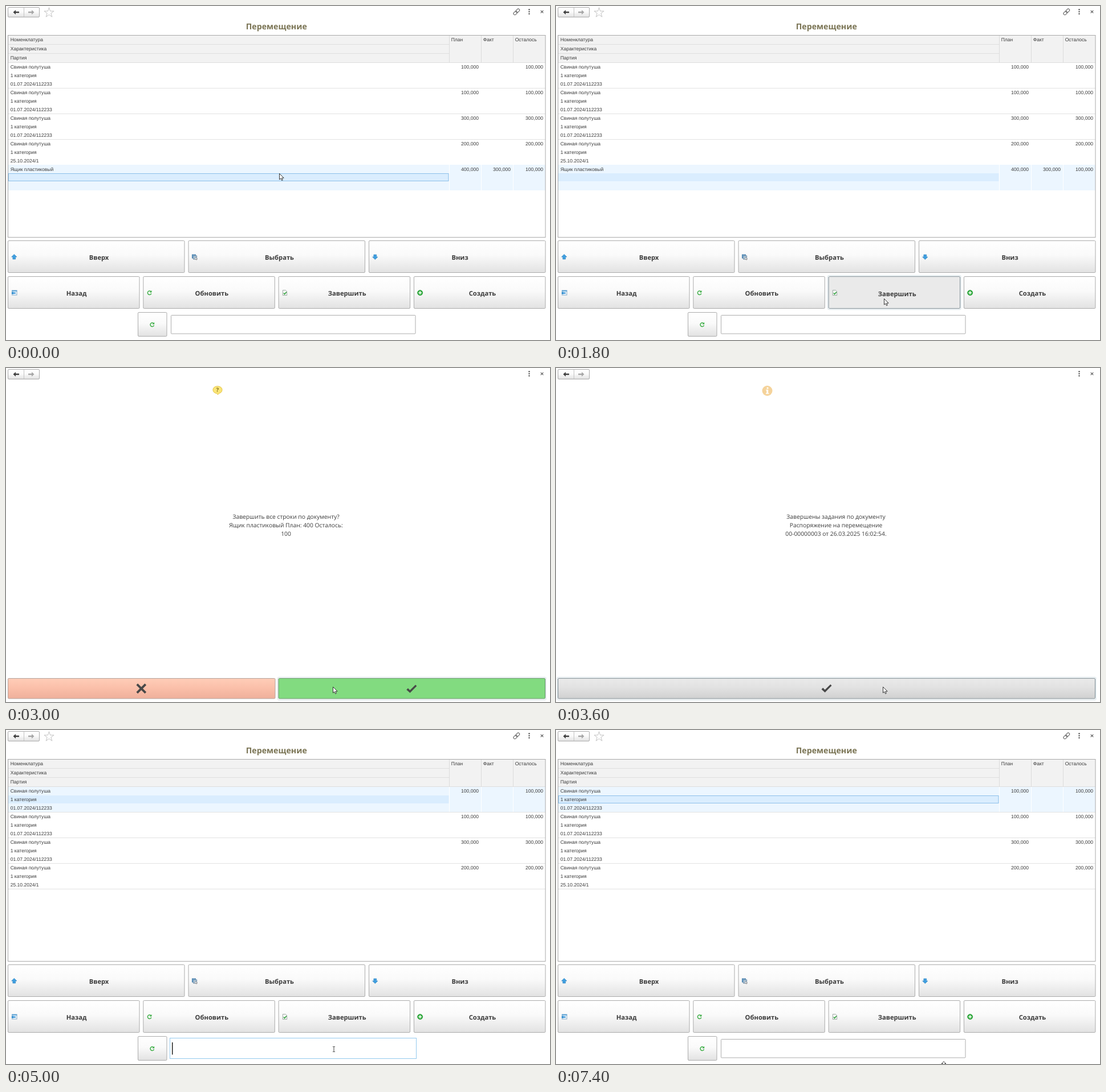
Recreate the animation shown at these times as an HTML page. Size 954 by 587 pixels, loop 7800 ms.

```html
<!DOCTYPE html>
<html lang="ru">
<head>
<meta charset="utf-8">
<title>Перемещение</title>
<style>
html, body { margin: 0; width: 100%; height: 100%; overflow: hidden; background: #fff; }
svg { display: block; width: 954px; height: 587px; }
text { text-rendering: geometricPrecision; fill: #3a3a3a; }
.cell { font: 8.55px "Liberation Sans", Arial, sans-serif; }
.label { font: bold 11.2px "Open Sans", "Noto Sans", sans-serif; text-anchor: middle; }
.title { font: bold 14.2px "Open Sans", "Noto Sans", sans-serif; text-anchor: middle; fill: #7a7454; }
.note { font: 10.3px "Open Sans", "Noto Sans", sans-serif; text-anchor: middle; }
.end { text-anchor: end; }
</style>
</head>
<body>
<svg viewBox="0 0 954 587">
  <defs id="fills"></defs>
  <g id="scene"></g>
  <g id="pointer"></g>
</svg>
<script>
const LOOP = 7800;

// time, scene, button state, selected cell framed, pointer shape, x, y
const STEPS = [
  [0, 'full', '', 1, 'arrow', 479, 294],
  [400, 'full', '', 1, 'arrow', 504, 298],
  [1000, 'full', '', 1, 'arrow', 546, 420],
  [1200, 'full', 'hover', 1, 'arrow', 574, 489],
  [1400, 'full', 'hover', 1, 'arrow', 710, 530],
  [1800, 'full', 'down', 0, 'arrow', 575, 514],
  [2000, 'ask', '', 0, 'arrow', 575, 514],
  [2600, 'ask', '', 0, 'arrow', 575, 543],
  [2800, 'ask', 'hover', 0, 'arrow', 573, 560],
  [3000, 'ask', 'down', 0, 'arrow', 573, 560],
  [3600, 'info', 'hover', 0, 'arrow', 573, 560],
  [4400, 'info', 'down', 0, 'arrow', 573, 560],
  [4800, 'info', 'down', 0, 'beam', 575, 561],
  [5000, 'rest', 'input', 0, 'beam', 575, 561],
  [5400, 'rest', 'input', 0, 'arrow', 559, 498],
  [5600, 'rest', 'input', 0, 'arrow', 493, 349],
  [5800, 'rest', 'input', 0, 'arrow', 475, 316],
  [6000, 'rest', 'input', 0, 'arrow', 473, 314],
  [6200, 'rest', '', 1, 'arrow', 473, 314],
  [6600, 'rest', 'hover', 1, 'arrow', 651, 547],
  [6800, 'rest', '', 1, 'arrow', 675, 579],
  [7000, 'rest', '', 1, 'arrow', 675, 582],
  [7400, 'rest', '', 1, 'resize', 680, 582]
];

const FILLS = {
  plain: ['#ffffff', '#fafafa', '#e2e2e2'],
  hover: ['#f3f3f3', '#ececec', '#d9d9d9'],
  wide: ['#eaeaea', '#e2e2e2', '#d0d0d0'],
  red: ['#ffcdb8', '#fbc0aa', '#efb09b'],
  green: ['#a9ffa6', '#9cf99a', '#8be988'],
  greenHover: ['#9cf29a', '#90e98e', '#80d97e']
};

const $ = id => document.getElementById(id);
$('fills').innerHTML = Object.entries(FILLS).map(([id, c]) =>
  `<linearGradient id="${id}" x2="0" y2="1"><stop stop-color="${c[0]}"/>` +
  `<stop offset=".45" stop-color="${c[1]}"/><stop offset="1" stop-color="${c[2]}"/></linearGradient>`).join('');

const rect = (x, y, w, h, fill, stroke = 'none', r = 0) =>
  `<rect x="${x}" y="${y}" width="${w}" height="${h}" rx="${r}" fill="${fill}" stroke="${stroke}"/>`;
const path = (d, fill, stroke = 'none', w = 1) =>
  `<path d="${d}" fill="${fill}" stroke="${stroke}" stroke-width="${w}"/>`;
const line = (d, stroke, w = 1) => path(d, 'none', stroke, w);
const dot = (x, y, r, fill, stroke = 'none') =>
  `<circle cx="${x}" cy="${y}" r="${r}" fill="${fill}" stroke="${stroke}"/>`;
const text = (x, y, s, cls) => `<text x="${x}" y="${y}" class="${cls}">${s}</text>`;
const at = (x, y, s) => `<g transform="translate(${x} ${y})">${s}</g>`;
const box = (x, y, w, h, fill = 'url(#plain)', stroke = '#ababab') => rect(x, y, w, h, fill, stroke, 1.5);
const ring = (x, y, w, h) => rect(x - 1.5, y - 2, w + 3, h + 4, 'none', '#d3dfe4', 2);

const arrowUp = path('M0-4.6L4.7 0H2.4V4H-2.4V0H-4.7Z', '#3f9fe0', '#2b7fbd', .6);
const icons = {
  up: arrowUp,
  down: `<g transform="rotate(180)">${arrowUp}</g>`,
  pick: rect(-4.3, -4, 6, 6, '#6fa9d6', '#4d7fa8') + rect(-2.3, -2, 6, 6, '#cfe0ee', '#6485a0') +
    line('M-1 0H2.5M-1 2H2.5', '#5f8bb0', .8) + path('M1 0V5L2.3 4L3.2 5.5L4 5L3.2 3.5H5Z', '#fff', '#555', .5),
  back: rect(-3.7, -4, 8.4, 8, '#f3f9fe', '#84a9c6') + rect(-4, -4.3, 9, 2, '#5ba4d8') +
    path('M-5 .5L-1.7-2V-.4H2.5V1.4H-1.7V3Z', '#1f86cf'),
  refresh: line('M2.4-2.3A3.3 3.3 0 1 0 3.2 1.2', '#3dae46', 1.5) + path('M3.9-4.2V-.4H.2Z', '#3dae46'),
  done: path('M-3.5-4.5H1.5L3.7-2.3V4.5H-3.5Z', '#fafafa', '#8a9690', .8) +
    line('M-2 .6L-.3 2.6L3-1.4', '#31a23d', 1.5),
  add: dot(0, 0, 4.5, '#3cb449', '#319c3d') + line('M-2.7 0H2.7M0-2.7V2.7', '#fff', 1.5),
  check: path('M-9 1.5L-6.3-1.2L-2.9 2.2L6.8-7.2L9-5L-2.8 7Z', '#484848'),
  cross: line('M-7.5-7.5L7.5 7.5M7.5-7.5L-7.5 7.5', '#484848', 3.8)
};

const pointers = {
  arrow: path('M.5.5V11L2.9 8.8L4.6 12.5L6.3 11.8L4.7 8.2H8.2Z', '#fff', '#222', .9),
  beam: line('M-2-4.5H-.5L0-4L.5-4.5H2M0-4V4M-2 4.5H-.5L0 4L.5 4.5H2', '#333', .9),
  resize: path('M0 .6L4 4.5H1.5V9H-1.5V4.5H-4Z', '#fff', '#222', .9)
};

function topBar(isList) {
  const arrow = 'M-5.5 0L-1-4V-1.2H5V1.2H-1V4Z';
  let s = box(3.5, 2.5, 55, 17) + line('M31.5 3V19', '#c4c4c4') +
    at(18, 11, path(arrow, '#404040')) +
    at(44, 11, `<g transform="scale(-1 1)">${path(arrow, '#a6a6a6')}</g>`) +
    [6.3, 10, 13.7].map(y => dot(917.5, y, 1.2, '#555')).join('') +
    line('M937.7 7.8L942.3 12.4M942.3 7.8L937.7 12.4', '#555', 1.1);
  if (!isList) return s;
  const star = Array.from({ length: 10 }, (_, i) => {
    const r = i % 2 ? 3.5 : 9, a = i * Math.PI / 5;
    return `${(75.5 + r * Math.sin(a)).toFixed(2)} ${(11.8 - r * Math.cos(a)).toFixed(2)}`;
  });
  const link = '<rect x="-6.5" y="-2.3" width="7.2" height="4.6" rx="2.3" fill="none" stroke="#666" stroke-width="1.1"/>';
  return s + line(`M${star.join('L')}Z`, '#bcbcbc', .9) +
    `<g transform="translate(895.3 10.3) rotate(-45)">${link}<g transform="rotate(180)">${link}</g></g>`;
}

function table(rows, selected, framed) {
  const cols = [777, 833, 889], pitch = 44.8;
  let s = rect(4, 52, 942, 48, '#f2f2f2') +
    line('M4 67.5H777M4 83.5H777M4 99.5H946', '#dedede') +
    cols.map(x => line(`M${x + .5} 52V100`, '#dcdcdc')).join('') +
    ['Номенклатура', 'Характеристика', 'Партия'].map((h, i) => text(7.7, 62 + i * 16, h, 'cell')).join('') +
    ['План', 'Факт', 'Осталось'].map((h, i) => text(cols[i] + 3.7, 62, h, 'cell')).join('');
  rows.forEach((row, i) => {
    const y = 100 + i * pitch, top = Math.round(y);
    if (i === selected) {
      s += rect(4, top, 942, 45, '#ecf6ff') + cols.map(x => line(`M${x + .5} ${top}V${top + 45}`, '#fff')).join('');
      s += rect(4, top + 15, 772.5, 14, '#daedfe');
      if (framed) s += rect(4.5, top + 15.5, 771.5, 13, 'none', '#8dc0ea');
    }
    if (i < 4) s += line(`M4 ${Math.floor(y + pitch) + .5}H946`, '#e2e2e2');
    row.slice(0, 3).forEach((v, k) => { s += text(7.7, y + 10.3 + k * 14.93, v, 'cell'); });
    row.slice(3).forEach((v, k) => { s += text([829, 885, 942][k], y + 10.3, v && v + ',000', 'cell end'); });
  });
  return s + rect(3.5, 51.5, 942.5, 355, 'none', '#a9a9a9');
}

function button(x, y, w, icon, label, state) {
  const down = state === 'down';
  const fill = down ? '#eaeaea' : state === 'hover' ? 'url(#hover)' : 'url(#plain)';
  return (down ? ring(x, y, w, 56) : '') + box(x, y, w, 56, fill, down ? '#7e8d94' : '#ababab') +
    at(x + 10.8, y + 28.5, icons[icon]) + text(x + w / 2 + 4.8, y + 33.3 + (down ? .7 : 0), label, 'label');
}

function list(full, state, framed) {
  const pork = (batch, n) => ['Свиная полутуша', '1 категория', batch, n, '', n];
  const rows = [pork('01.07.2024/112233', 100), pork('01.07.2024/112233', 100),
    pork('01.07.2024/112233', 300), pork('25.10.2024/1', 200)];
  if (full) rows.push(['Ящик пластиковый', '', '', 400, 300, 100]);
  const active = state === 'input';
  return topBar(true) + text(474.3, 41, 'Перемещение', 'title') + table(rows, full ? 4 : 0, framed) +
    [['up', 'Вверх'], ['pick', 'Выбрать'], ['down', 'Вниз']]
      .map((b, i) => button(3.5 + i * 316.5, 412.5, 309.5, ...b)).join('') +
    [['back', 'Назад'], ['refresh', 'Обновить'], ['done', 'Завершить', state], ['add', 'Создать']]
      .map((b, i) => button(3.5 + i * 237.3, 475.5, 230.5, ...b)).join('') +
    box(231.5, 538.5, 50.5, 42) + at(256.3, 560, icons.refresh) +
    (active
      ? rect(287.5, 541.5, 432, 36, '#fff', '#93c9ee') + rect(291, 549, 1.5, 21.5, '#222')
      : rect(289.5, 543.5, 428.5, 32.5, '#fff', '#adadad', 1));
}

const note = lines => lines.map((s, i) => text(491, 264.7 + i * 15, s, 'note')).join('');

function ask(state) {
  const down = state === 'down';
  const fill = down ? '#82db80' : state === 'hover' ? 'url(#greenHover)' : 'url(#green)';
  return topBar(false) +
    path('M371 32C375.8 32 379 34.8 379 38.4S376 44.2 373.5 44.5L371.5 47L369.5 44.7C366 44.2 363 42 363 38.4S366.2 32 371 32Z',
      '#fbe678', '#dfbd3c', .9) +
    `<text x="371" y="42" font-family="Open Sans, sans-serif" font-size="10" font-weight="700" text-anchor="middle" style="fill:#8a7425">?</text>` +
    note(['Завершить все строки по документу?', 'Ящик пластиковый План: 400 Осталось:', '100']) +
    (down ? ring(478, 545.5, 467.5, 36) : ring(3.5, 545.5, 468.5, 36)) +
    box(3.5, 545.5, 468.5, 35.5, 'url(#red)', '#b5a49d') + at(237.3, 563.3, icons.cross) +
    box(478, 545.5, 467.5, 35.5, fill, down ? '#66936a' : '#9bb59b') + at(711.3, down ? 564 : 563.3, icons.check);
}

function info(state) {
  const down = state === 'down';
  return topBar(false) + dot(370.5, 40, 9, '#f5d39b') +
    dot(371, 35.2, 1.5, '#fff') + path('M368.3 38H372.2V44H373.4V45.5H368V44H369.3V39.4H368.3Z', '#fff') +
    note(['Завершены задания по документу', 'Распоряжение на перемещение', '00-00000003 от 26.03.2025 16:02:54.']) +
    ring(3.5, 545.5, 942, 36) +
    box(3.5, 545.5, 942, 35.5, down ? '#cfcfcf' : 'url(#wide)', '#7e8d94') +
    (down ? line('M4.5 546.5H944.5', '#a5acaf') : '') + at(474.5, down ? 564 : 563.3, icons.check);
}

function draw([, scene, state, framed, shape, x, y]) {
  $('scene').innerHTML = scene === 'ask' ? ask(state) : scene === 'info' ? info(state)
    : list(scene === 'full', state, framed);
  $('pointer').innerHTML = at(x, y, pointers[shape]);
}

let shown;
const start = performance.now();
function tick() {
  const t = (performance.now() - start) % LOOP;
  const step = STEPS.findLast(s => s[0] <= t) || STEPS[0];
  if (step !== shown) draw(shown = step);
  requestAnimationFrame(tick);
}
tick();
</script>
</body>
</html>
```
